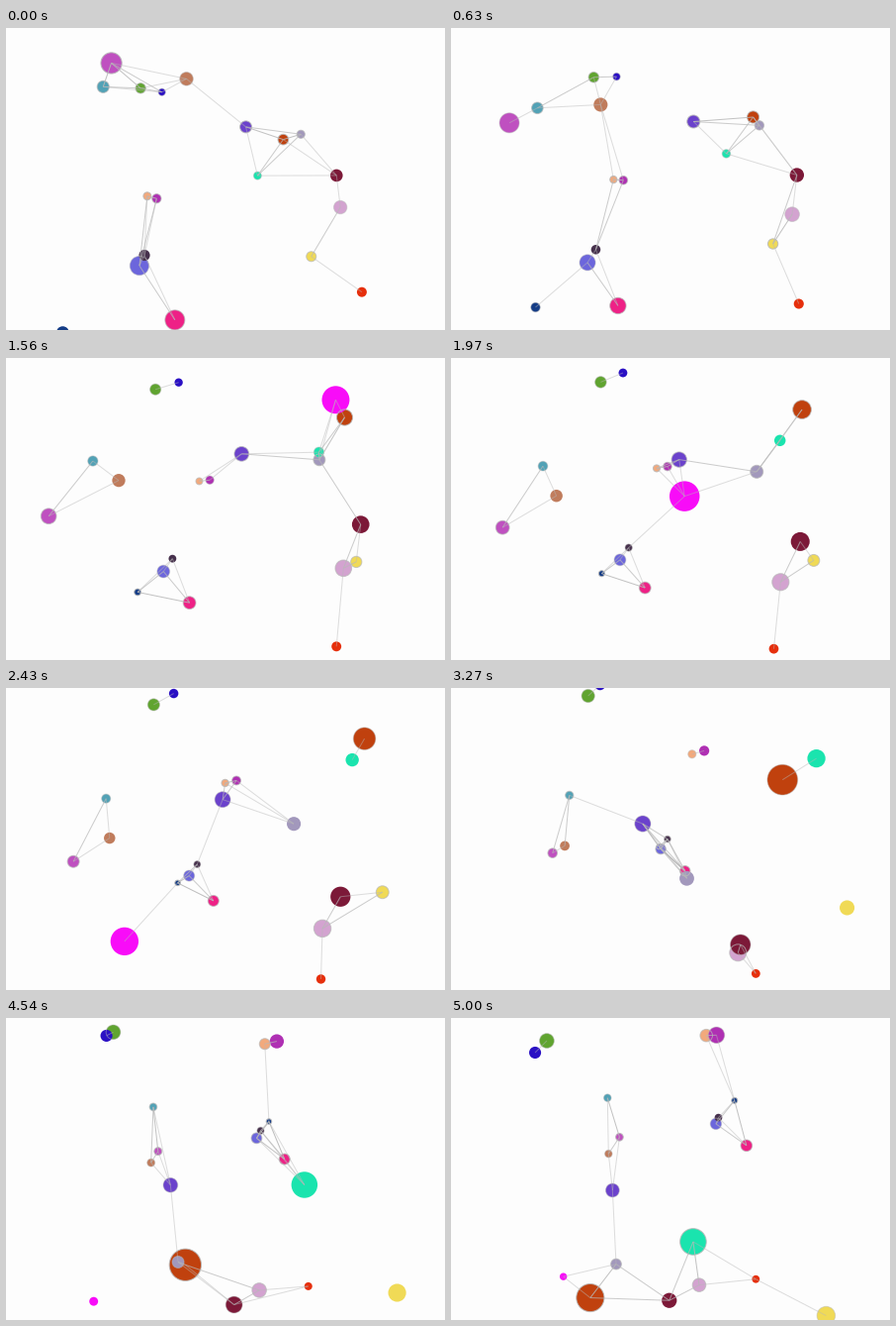
These frames come from a looping animation (444x305 px, 5100 ms). A matplotlib script:

```python
import numpy as np
import matplotlib.pyplot as plt
from matplotlib.animation import FuncAnimation
from matplotlib.collections import LineCollection
from matplotlib.colors import to_rgb

W, H, DPI = 444, 305, 100
LOOP, INTERVAL = 5100, 20
FOV = 250                       # eye distance of the perspective
SPIN = np.radians(34.1)         # turn per second about the diagonal axis
REACH = 81                      # nodes closer than this are linked
PX = 72 / DPI                   # points per pixel
CENTER = np.array([W, H]) / 2

# Colour, starting place on the stage, depth, unscaled radius
NODES = (
    ("#f2a97c", 142.5, 170, 66, 5.0),
    ("#af30b3", 152, 172.5, 79, 6.1),
    ("#143c86", 57, 308, -84, 4.3),
    ("#ee2186", 171, 295, -60.5, 7.6),
    ("#6c66dc", 135, 240, -59, 7.4),
    ("#46304c", 140, 229.5, -40.5, 4.7),
    ("#bf50c0", 107.5, 34.5, -118, 5.6),
    ("#52a2b6", 98.5, 59, -57, 4.7),
    ("#60a430", 136, 61, 44.5, 6.1),
    ("#2a10c4", 157.5, 65, 61.5, 4.5),
    ("#c07c5c", 183, 51, -73.5, 4.8),
    ("#6b42cc", 242.5, 100, 14, 6.3),
    ("#c0410e", 280, 113, 102.5, 7.5),
    ("#a298bc", 298, 107.5, 26.5, 4.5),
    ("#1ae4ae", 254, 149.5, 131, 6.1),
    ("#f0da56", 308.5, 231, 74.5, 6.5),
    ("#d3a3d0", 338, 181, -3.5, 6.6),
    ("#7c1938", 334, 149, 16.5, 6.7),
    ("#e62f0c", 360, 266.5, -31.5, 4.35),
    ("#f80cf8", 383, -8, -65, 4.25),
)
COUNT = len(NODES)
COLORS = [to_rgb(node[0]) for node in NODES]
X, Y, DEPTH, SIZE = np.array([node[1:] for node in NODES]).T

# Undo the perspective, then split into parts along and across the axis
SCALE = 1 + DEPTH / FOV
DX, DY = (X - CENTER[0]) * SCALE, (Y - CENTER[1]) * SCALE
ALONG, ACROSS = (DX + DY) / np.sqrt(2), (DX - DY) / np.sqrt(2)


def project(seconds):
    """Stage positions and radii of the turned cloud."""
    c, s = np.cos(SPIN * seconds), np.sin(SPIN * seconds)
    across = ACROSS * c + DEPTH * s
    depth = DEPTH * c - ACROSS * s
    zoom = FOV / (FOV + depth)
    flat = np.column_stack([ALONG + across, ALONG - across]) / np.sqrt(2)
    return CENTER + flat * zoom[:, None], SIZE * zoom


def ink(strokes):
    """Translucent grey that darkens with repeated strokes."""
    return (0.72, 0.72, 0.72, 1 - 0.53**strokes)


fig = plt.figure(figsize=(W / DPI, H / DPI), dpi=DPI, facecolor="#fdfdfd")
ax = fig.add_axes([0, 0, 1, 1])
ax.set_xlim(0, W)
ax.set_ylim(H, 0)
ax.axis("off")

zeros = np.zeros(COUNT)
discs = ax.scatter(zeros, zeros, c=COLORS, linewidths=0, zorder=1)
rims = ax.scatter(zeros, zeros, facecolors="none", edgecolors="gray",
                  linewidths=PX, zorder=2)
links = LineCollection([], linewidths=PX, zorder=3)
ax.add_collection(links)
for artist in (discs, rims, links):
    artist.set_snap(False)


def draw(frame):
    pos, radii = project((frame + 0.5) * INTERVAL / 1000)

    lines, tints, rim_tints = [], [], []
    for i in range(COUNT):
        gaps = np.hypot(*(pos[i + 1:] - pos[i]).T)
        near = i + 1 + np.flatnonzero(gaps < REACH)
        rim_tints.append(ink(len(near)))
        # Every new link strokes the earlier ones of this node again
        for k, j in enumerate(near):
            lines.append((pos[i], pos[j]))
            tints.append(ink(len(near) - k))

    for circles in (discs, rims):
        circles.set_offsets(pos)
        circles.set_sizes((2 * radii * PX)**2, DPI)
    rims.set_edgecolors(rim_tints)
    links.set_segments(lines)
    links.set_color(tints)
    return discs, rims, links


anim = FuncAnimation(fig, draw, frames=LOOP // INTERVAL, interval=INTERVAL,
                     repeat=True, repeat_delay=0, blit=False)
plt.show()
```
